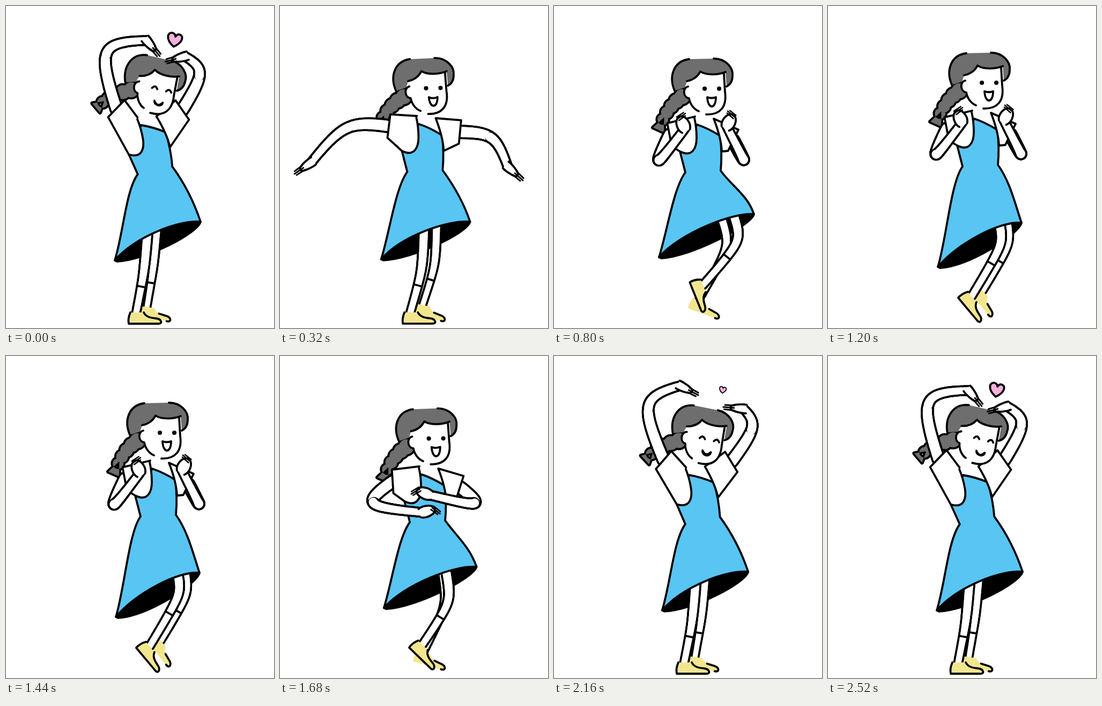
Animation of 500x600 px, one loop 2.56 s. Source, as an HTML page with a canvas:

```html
<!DOCTYPE html>
<html lang="en">
<head>
<meta charset="utf-8">
<title>Dancing girl</title>
<style>
html, body { margin: 0; width: 100%; height: 100%; overflow: hidden; background: #fff; }
canvas { display: block; }
</style>
</head>
<body>
<canvas id="stage" width="500" height="600"></canvas>
<script>
const ctx = document.getElementById('stage').getContext('2d');
const LOOP = 2560, STEP = 40, LINE = 3.8;
const HAIR = '#6e6e6e', BLUE = '#59c5f3', YELLOW = '#f2e68f', PINK = '#f3b1dd';
const rad = Math.PI / 180;

// torso: neckline x, y, lean   face: tilt, mouth opening   braid: tip seen from the head
// hem: right and left corner   arm: sleeve angle, elbow angle and distance, wrist angle and distance, hand angle, curl
// leg: hip along the hem, knee, ankle, foot angle
const overhead = {
  torso: [252, 222, -10], face: [14, 0], braid: [-122, 34], hem: [363, 402, 203, 474],
  armL: [224, 252, 131, 294, 139, 410, 0], armR: [-35, -58, 89, -87, 100, -195, 0],
  legL: [.38, 258, 495, 243, 571, 0], legR: [.49, 275, 490, 263, 561, 8]
};
const wide = {
  torso: [259, 220, 0], face: [-2, 1], braid: [-98, 76], hem: [355, 402, 190, 472],
  armL: [190, 198, 79, 172, 170, 170, 0], armR: [2, -6, 66, 21, 116, 20, 0],
  legL: [.47, 264, 495, 243, 571, 0], legR: [.59, 282, 490, 263, 561, 8]
};
const folded = {
  torso: [262, 220, 0], face: [4, .3], braid: [-130, 44], hem: [352, 402, 181, 471],
  armL: [167, 124, 100, 46, 93, -10, 0], armR: [28, 45, 68, 132, 72, 185, 0],
  legL: [.56, 279, 470, 245, 570, 0], legR: [.84, 345, 438, 286, 533, 45]
};
const landing = {
  torso: [267, 221, 0], face: [0, 1], braid: [-99, 76], hem: [373, 388, 196, 468],
  armL: [169, 116, 82, -22, 31, -115, 1], armR: [26, 62, 68, 245, 29, 300, 1],
  legL: [.77, 352, 436, 278, 520, 68], legR: [.65, 330, 445, 270, 548, 20]
};
const hop = {
  ...landing, torso: [273, 210, 0], hem: [361, 404, 205, 486],
  legL: [.73, 328, 442, 268, 541, 50], legR: [.82, 342, 443, 289, 531, 50]
};

const smooth = u => u * u * (3 - 2 * u);
const backOut = s => u => 1 + (s + 1) * (u - 1) ** 3 + s * (u - 1) ** 2;
const settle = backOut(.8), pop = backOut(2);

const hops = Array.from({ length: 6 }, (_, i) => [960 + i * 120, i % 2 ? landing : hop]);
const keys = [
  [0, overhead], [260, wide], [520, folded], [600, folded], [800, landing], ...hops,
  [1860, wide], [1940, wide], [2480, overhead, settle], [LOOP, overhead]
];

const lerp = (a, b, u) => a + (b - a) * u;

function poseAt(t) {
  const i = keys.findIndex(k => k[0] > t);
  const [t0, a] = keys[i - 1], [t1, b, ease = smooth] = keys[i];
  const u = ease((t - t0) / (t1 - t0)), pose = {};
  for (const part in a) pose[part] = a[part].map((v, k) => lerp(v, b[part][k], u));
  return pose;
}

const polar = ([x, y], angle, r) => [x + r * Math.cos(angle * rad), y + r * Math.sin(angle * rad)];
const add = ([x, y], dx, dy) => [x + dx, y + dy];
const torsoPoint = ([x, y, lean], dx, dy) => polar(polar([x, y], lean, dx), lean + 90, dy);

function paint(path, fill, stroke = '#000', width = LINE) {
  if (typeof path == 'string') path = new Path2D(path);
  if (fill) { ctx.fillStyle = fill; ctx.fill(path); }
  if (stroke) { ctx.strokeStyle = stroke; ctx.lineWidth = width; ctx.stroke(path); }
}

function at([x, y], angle, draw, scale = 1) {
  ctx.save();
  ctx.translate(x, y);
  ctx.rotate(angle * rad);
  ctx.scale(scale, scale);
  draw();
  ctx.restore();
}

// Conic from a to b, pulled towards the joint; a larger weight makes a sharper bend.
const bend = (a, joint, b, weight) => t => {
  const wa = (1 - t) ** 2, wj = 2 * weight * t * (1 - t), wb = t * t;
  return [0, 1].map(k => (a[k] * wa + joint[k] * wj + b[k] * wb) / (wa + wj + wb));
};

// Tapered tube: a black pass, then a narrower white one.
function limb(curve, w0, w1, start = 0) {
  for (const [color, edge, from] of [['#000', LINE, start], ['#fff', -LINE, Math.max(0, start - .06)]]) {
    ctx.strokeStyle = color;
    for (let t = from; t < .999; t += .02) {
      ctx.lineWidth = lerp(w0, w1, t) + edge;
      ctx.beginPath();
      ctx.moveTo(...curve(t));
      ctx.lineTo(...curve(Math.min(1, t + .02)));
      ctx.stroke();
    }
  }
}

function drawLeg([along, kx, ky, ax, ay, foot], [rx, ry, lx, ly], front) {
  const hip = [lerp(lx, rx, along), lerp(ly, ry, along) - 25];
  const curve = bend(hip, [kx, ky], [ax, ay], 3), width = front ? 15 : 13;
  limb(curve, width + 4, width);
  const [x, y] = curve(.8), [x2, y2] = curve(.84);
  at([x, y], Math.atan2(y2 - y, x2 - x) / rad, () => paint(`M0 ${-width / 2}V${width / 2}`));
  at([ax, ay], foot, () => {
    const toe = 'C48 12 50 22 40 21';
    const shoe = `M14 0C18 8 26 10 36 11${toe}L-14 21C-15 16 -15 9 -11 0`;
    paint(shoe, YELLOW, front && '#000');
    if (!front) paint('M24 9L36 11' + toe);
  });
}

// The sleeve reaches further when the arm is raised.
function solveArm(torso, [sleeve, elbowDir, elbow, wristDir, wrist, hand, curl], side) {
  const pivot = torsoPoint(torso, side > 0 ? -5 : 28, 10);
  const cuff = polar(pivot, sleeve, 50 - 14 * Math.sin(sleeve * rad));
  const end = polar(cuff, wristDir, wrist);
  return { side, cuff, sleeve, end, hand, curl, curve: bend(cuff, polar(cuff, elbowDir, elbow), end, 2) };
}

function drawSleeve(torso, { side, cuff, sleeve, curve }) {
  limb(curve, 23, 16);
  const p = (x, y) => torsoPoint(torso, x, y);
  const upper = polar(cuff, sleeve + 90, 22 * side), lower = polar(cuff, sleeve - 90, 22 * side);
  paint(side > 0
    ? `M${p(-4, -15)}L${upper}L${lower}L${p(-32, 50)}C${p(-8, 62)} ${p(-1, 42)} ${p(-1, 25)}Q${p(-1, 5)} ${p(-5, -12)}`
    : `M${p(31, -11)}L${upper}L${lower}L${p(46, 50)}Q${p(45, 25)} ${p(31, -11)}Z`, '#fff');
}

function drawForearm({ side, end, hand, curl, curve }) {
  limb(curve, 23, 16, .5);
  at(end, hand, () => {
    const round = 6 * curl;
    paint(`M-5 -8C4 ${-9 - round} 20 ${-6 - round} 24 -3L24 3C20 ${6 + round} 4 ${9 + round} -5 8`, '#fff');
    at([23, 0], 80 * curl * side, () =>
      paint('M-5 -4.5L13 -4M-5 0L15 0M-5 4.5L12 4', null, '#000', 3), 1 - .15 * curl);
  });
}

function drawBraid([dx, dy], head, tilt) {
  const start = polar(polar(head, tilt, -55), tilt + 90, 14), tip = add(head, dx, dy);
  const joint = [lerp(start[0], tip[0], .65), lerp(start[1], tip[1], .3)];
  const curve = bend(start, joint, tip, 1), braid = new Path2D();
  for (let i = 0; i < 5; i++) {
    const [x, y] = curve(i * .19), r = 14 - i;
    braid.moveTo(x + r, y);
    braid.arc(x, y, r, 0, 7);
  }
  const [x, y] = curve(.7), angle = Math.atan2(tip[1] - y, tip[0] - x) / rad;
  braid.addPath(new Path2D(`M${[x, y]}L${polar(tip, angle + 90, 11)}L${polar(tip, angle - 90, 11)}Z`));
  paint(braid, null, '#000', LINE * 2);
  paint(braid, HAIR, null);
}

function drawHead(head, tilt, open) {
  at(head, tilt, () => {
    ctx.translate(-294, -155);
    const jaw = 'M250 150C240 152 240 170 252 172C254 184 262 193 270 196';
    const back = 'M252 99C222 103 214 132 225 158';
    const fringe = 'L248 140C258 138 268 132 273 122C285 130 308 128 320 123';
    const lock = 'L322 150C328 147 333 142 333 130C335 115 320 98 298 98';
    paint(jaw + 'L284 202C312 202 322 188 319 160L317 122L260 125Z', '#fff', null);
    paint(back + 'L244 152' + fringe + lock + 'Z', HAIR, null);
    for (const line of [back, fringe, lock]) paint(line.replace('L', 'M'));
    paint(jaw + 'M317 126L319 160C323 188 310 203 284 202');
    for (const eye of [281, 308]) {
      if (open < .15) paint(`M${eye - 5} 156Q${eye} 148 ${eye + 5} 156`);
      else paint(`M${eye} 154h.1`, null, '#000', 8);
    }
    const top = lerp(12, 3, open), bottom = 9 + 14 * open, y = 178 - 8 * open;
    paint(`M286 ${y}Q294 ${y + top} 302 ${y}C302 ${y + bottom} 287 ${y + bottom} 286 ${y}Z`, '#fff');
  });
}

function drawDress(torso, [rx, ry, lx, ly]) {
  const p = (x, y) => torsoPoint(torso, x, y), waistR = p(44, 86), waistL = p(-22, 89);
  paint(`M${p(0, 0)}Q${p(21, 7)} ${p(43, 21)}Q${p(47, 55)} ${waistR}
    C${add(waistR, 22, 30)} ${rx - 12} ${ry - 36} ${rx} ${ry}
    C${rx - 40} ${ry - 4} ${lx + 38} ${ly - 44} ${lx} ${ly}
    C${lx + 16} ${ly - 52} ${add(waistL, -22, 30)} ${waistL}L${p(-32, 50)}Z`, BLUE);
}

function drawHeart(t) {
  const scale = t < 120 ? 1 - t / 120 : t > 2120 ? pop(Math.min(1, (t - 2120) / 360)) : 0;
  if (scale > 0) at([315, 63], 10, () =>
    paint('M0 13C-19 1 -15 -12 -7 -12C-3 -12 0 -9 0 -6C2 -10 5 -12 8 -11C16 -9 15 3 0 13Z', PINK), scale);
}

function draw(t) {
  const { torso, face: [tilt, open], braid, hem, armL, armR, legL, legR } = poseAt(t);
  const [rx, ry, lx, ly] = hem;
  const head = add(torso, 27 + .8 * tilt, -66);
  const arms = [solveArm(torso, armR, -1), solveArm(torso, armL, 1)];
  ctx.fillStyle = '#fff';
  ctx.fillRect(0, 0, 500, 600);
  ctx.lineCap = ctx.lineJoin = 'round';
  drawBraid(braid, head, tilt);
  paint(`M${rx} ${ry}C${rx - 5} ${ry + 21} ${lx + 58} ${ly} ${lx + 4} ${ly + 2}L${lx} ${ly}
    C${lx + 38} ${ly - 44} ${rx - 40} ${ry - 4} ${rx} ${ry}`, '#000');
  drawLeg(legR, hem, false);
  drawLeg(legL, hem, true);
  drawDress(torso, hem);
  for (const arm of arms) drawSleeve(torso, arm);
  drawHead(head, tilt, open);
  arms.forEach(drawForearm);
  drawHeart(t);
}

function frame(now) {
  draw(Math.floor(now % LOOP / STEP) * STEP);
  requestAnimationFrame(frame);
}
requestAnimationFrame(frame);
</script>
</body>
</html>
```
